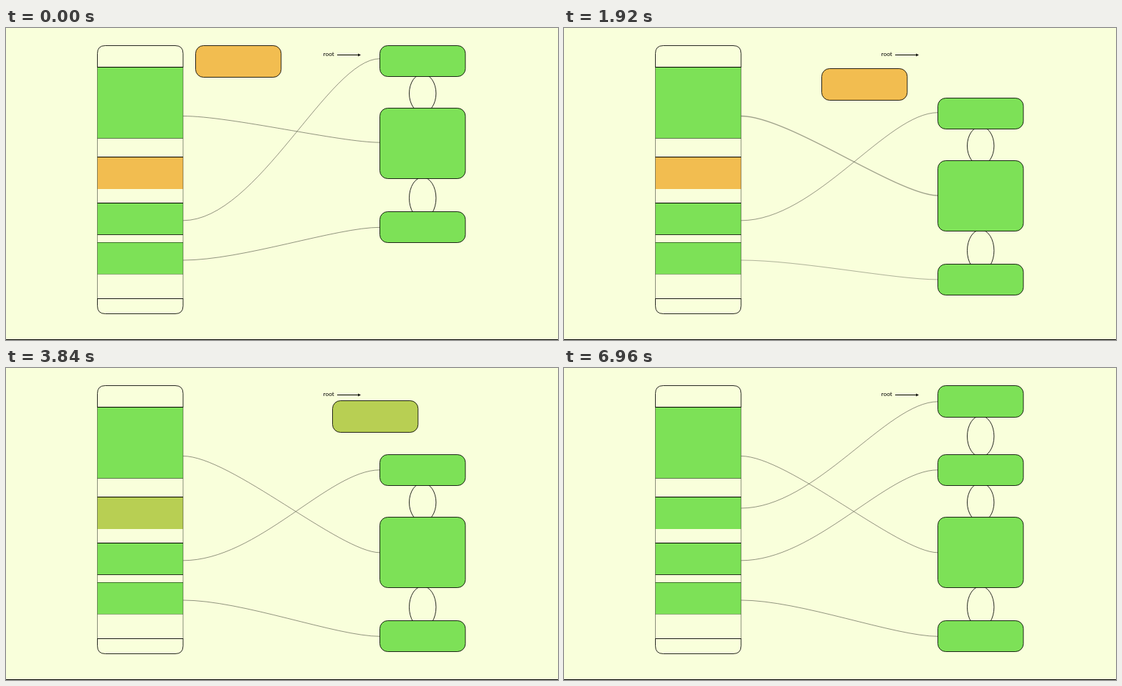
Write an HTML page that moves like this. It is 770 px wide and 434 px high and loops after 8.72 s.

```html
<!DOCTYPE html>
<html lang="en">
<head>
<meta charset="utf-8">
<title>Heap list insertion</title>
<style>
html, body { margin: 0; width: 100%; height: 100%; overflow: hidden; background: #f9ffdb; }
svg { display: block; width: 770px; height: 434px; }
text { font: 8.3px Lato, sans-serif; }
</style>
</head>
<body>
<svg id="stage" viewBox="0 0 770 434"></svg>
<script>
const LOOP = 8720, STEP = 80, MOVE = 980;
const GREEN = [125, 225, 87], ORANGE = [242, 189, 80];
const OUTLINE = { stroke: '#000', 'stroke-width': .85 };
const stage = document.getElementById('stage');

function add(parent, tag, attrs) {
  const el = document.createElementNS('http://www.w3.org/2000/svg', tag);
  for (const key in attrs) el.setAttribute(key, attrs[key]);
  parent.appendChild(el);
  return el;
}
const rgb = c => `rgb(${c.map(Math.round)})`;
const mix = (a, b, p) => a + (b - a) * p;
const ease = (t, start) => {
  const p = Math.min(1, Math.max(0, (t - start) / MOVE));
  return (1 - Math.cos(Math.PI * p)) / 2;
};
const box = (parent, x, y, height, fill) => add(parent, 'rect',
  { x, y, width: 119.3, height, rx: 11, fill, ...OUTLINE });
const loopLink = (parent, cy, ry) => add(parent, 'ellipse',
  { cx: 581.2, cy, rx: 18.7, ry, fill: 'none', ...OUTLINE });

// Connector drawn relative to its left end; k1 and k2 place the handles.
function curve(h, k1, k2) {
  const w = 274.5;
  return add(stage, 'path', {
    d: `M0 0C${w * k1} 0 ${w * k2} ${h} ${w} ${h}`,
    fill: 'none', stroke: '#4c4c40', 'stroke-width': .6
  });
}

// Memory column
const slot = (y, h, c) => add(stage, 'rect', { x: 127.5, y, width: 119.5, height: h, fill: rgb(c) });
slot(54.5, 99, GREEN);
const newSlot = slot(179.5, 44.5, ORANGE);
slot(243.5, 44, GREEN);
slot(298, 44.4, GREEN);
for (const [y, width] of [[54.5, 1], [153.5, .5], [179.5, 1], [243.5, 1],
                          [287.5, .8], [298.5, .5], [342.5, .3], [376.5, .9]])
  add(stage, 'path', { d: `M127.5 ${y}H247`, stroke: '#000', 'stroke-width': width });
add(stage, 'path', { d: 'M127.5 54V377M247 54V377', stroke: '#000', 'stroke-width': .45 });
add(stage, 'path', {
  d: 'M127.5 54.5V35.5Q127.5 24.5 138.5 24.5H236Q247 24.5 247 35.5V54.5' +
     'M127.5 376.5V386.5Q127.5 397.5 138.5 397.5H236Q247 397.5 247 386.5V376.5',
  fill: 'none', ...OUTLINE
});

// Connectors: left y, right y before, right y after, handles
const links = [
  [122.5, 159.2, 256.8, .24, .8],
  [267.8, 42.7, 141.8, .38, .74],
  [323, 277.3, 373.3, .3, .78]
].map(([y, from, to, k1, k2]) => ({
  y, from, to,
  before: curve(from - y, k1, k2),
  after: curve(to - y, k1, k2)
}));
const newLink = curve(46.8 - 195, .38, .74);
newLink.setAttribute('transform', 'translate(247 195)');

// Root label
add(stage, 'text', { x: 442.6, y: 39.2 }).textContent = 'root';
add(stage, 'path', { d: 'M462 37.5H494', stroke: '#000' });
add(stage, 'path', { d: 'M490.5 35.3L495 37.5L490.5 39.7L491.8 37.5Z' });

// Linked list
const newLoop = loopLink(stage, 95, 28.5);
const list = add(stage, 'g', {});
loopLink(list, 91, 27);
loopLink(list, 236.7, 29);
box(list, 521.5, 24.5, 43, rgb(GREEN));
box(list, 521.5, 111.5, 98, rgb(GREEN));
box(list, 521.5, 255.5, 43, rgb(GREEN));
const node = box(stage, 0, 0, 44, rgb(ORANGE));
add(stage, 'rect', { y: 433, width: 770, height: 1 });

// Both versions of a connector are squashed to the current height while fading.
function pose(path, link, h, full, opacity) {
  const s = h / full;
  path.setAttribute('transform', `translate(247 ${link.y}) scale(1 ${s})`);
  path.setAttribute('opacity', opacity);
  path.setAttribute('stroke-dasharray', Math.abs(s) < .3 ? '5 8' : 'none');
}

function draw(now) {
  const t = Math.floor((now % LOOP) / STEP) * STEP;
  const shift = ease(t, 1262), insert = ease(t, 3354), join = ease(t, 5955);

  // Boxes move by whole pixels so that their outlines stay crisp.
  list.setAttribute('transform', `translate(0 ${Math.round(96 * shift)})`);
  for (const link of links) {
    const h = mix(link.from, link.to, shift) - link.y;
    pose(link.before, link, h, link.from - link.y, 1 - shift);
    pose(link.after, link, h, link.to - link.y, shift);
  }

  const x = 264.5 + Math.round(126 * shift + 131 * insert);
  const y = 24.5 + Math.round(42 * (shift - insert));
  node.setAttribute('transform', `translate(${x} ${y})`);
  const fill = rgb(ORANGE.map((c, i) => mix(c, GREEN[i], insert)));
  node.setAttribute('fill', fill);
  newSlot.setAttribute('fill', fill);

  newLink.setAttribute('opacity', join);
  newLoop.setAttribute('opacity', join);
}

const start = performance.now();
function tick() {
  draw(performance.now() - start);
  requestAnimationFrame(tick);
}
tick();
</script>
</body>
</html>
```
